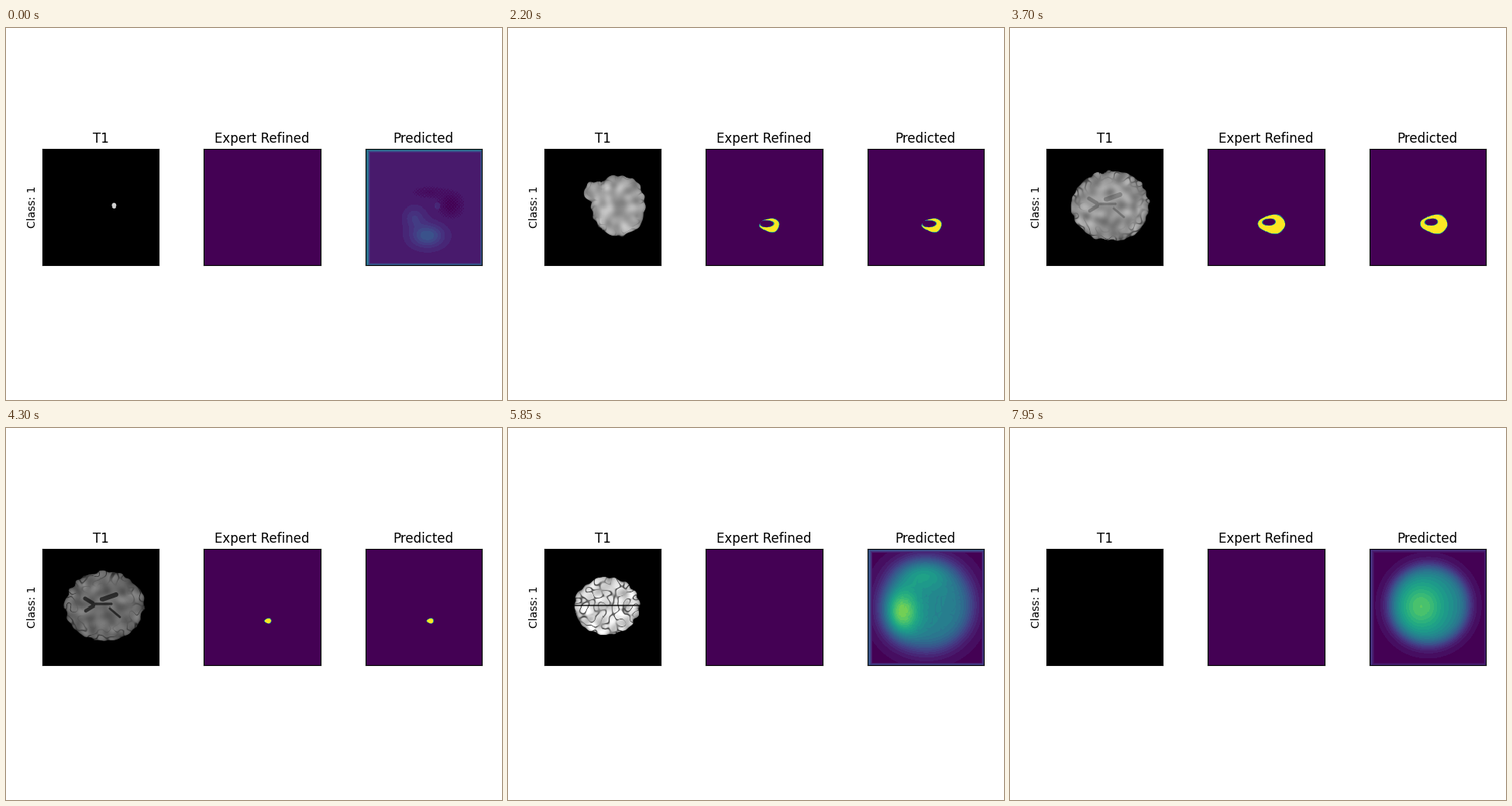
Animation of 640 by 480 pixels, one loop 8000 ms. Source, as a matplotlib script:

```python
import matplotlib.pyplot as plt
import numpy as np
from matplotlib.animation import FuncAnimation

FRAMES, N = 160, 150
LEFT, TOP, SIDE, STEP = 46.9, 155.9, 150.3, 208.4
LESION_FROM, LESION_TO = 31, 87  # slices where the lesion is segmented
CROWN, APEX = 80, 144            # widest and last slice of the head

rng = np.random.default_rng(11)
axis = (np.arange(N) + 0.5) * SIDE / N
X, Y = np.meshgrid(LEFT + axis, TOP + axis)
XP = X + 2 * STEP


def band_noise(k0, width):
    """Band-passed noise volume, slowly varying along the slice axis."""
    fz = np.fft.fftfreq(FRAMES)[:, None, None]
    fy = np.fft.fftfreq(N)[None, :, None]
    fx = np.fft.rfftfreq(N)[None, None, :]
    k = np.sqrt(fx**2 + fy**2 + (1.2 * fz)**2)
    spec = np.fft.rfftn(rng.standard_normal((FRAMES, N, N)))
    vol = np.fft.irfftn(spec * np.exp(-((k - k0) / width)**2), s=(FRAMES, N, N), axes=(0, 1, 2))
    return vol / vol.std()


folds = band_noise(0.082, 0.02)
shade = band_noise(0.05, 0.03)


def key(f, times, values):
    return float(np.interp(f, times, values))


def pulse(f, start, peak, end):
    return key(f, [start, peak, end], [0, 1, 0])


def gauss(x, y, cx, cy, sx, sy=None):
    return np.exp(-0.5 * (((x - cx) / sx)**2 + ((y - cy) / (sy or sx))**2))


def egg(x, y, cx, cy, rx, ry, taper=0):
    """Depth in pixels inside an ellipse that widens towards the right."""
    u = (x - cx) / rx
    v = (y - cy) / (ry * (1 + taper * np.clip(u, -1.2, 1.2)))
    return (1 - np.hypot(u, v)) * min(rx, ry)


def fill(depth):
    return np.clip(depth + 0.5, 0, 1)


def stroke(x0, y0, x1, y1, width):
    dx, dy = x1 - x0, y1 - y0
    t = np.clip(((X - x0) * dx + (Y - y0) * dy) / (dx * dx + dy * dy), 0, 1)
    return fill(width - np.hypot(X - x0 - t * dx, Y - y0 - t * dy))


SPLIT = stroke(70, 230, 185, 230, 1)
VENTRICLES = np.maximum.reduce([
    stroke(102, 221, 112, 227, 2.5), stroke(103, 236, 113, 230, 2.2),
    stroke(112, 228, 135, 228, 1.6), stroke(124, 222, 141, 216, 3),
    stroke(133, 233, 146, 244, 1.4)])


def head_depth(f):
    if f <= CROWN:
        times = [0, 28, 62, CROWN]
        cx = key(f, times, [138.5, 149, 133, 127])
        rx = key(f, times, [3, 21, 48, 50.5])
        ry = key(f, times, [3.2, 34, 45, 44.5])
    else:
        cx = 127
        rx = 50.5 * np.sqrt(max(0, 1 - ((f - CROWN) / (APEX - CROWN))**2)) + 0.01
        ry = 0.88 * rx
    depth = egg(X, Y, cx, 230, rx, ry, 0.14 * pulse(f, 30, 60, 80))
    # The frontal tip enters as a separate island and then merges
    tip = 14 * np.sin(np.pi * np.clip((f - 25) / 40, 0, 1))
    depth = np.maximum(depth, tip - np.hypot(X - 113, Y - 206 - 0.4 * max(0, f - 28)))
    return depth + 0.8 * min(1, rx / 20) * folds[f]


def scan(f):
    """Grey slice and its fold pattern."""
    depth = head_depth(f)
    mask = fill(depth) * (f < APEX)
    reach = key(f, [28, 62, 86, 110], [3, 7, 11, 80])
    power = key(f, [0, 28, 62, 117, 140], [0, 0.2, 0.5, 0.72, 0.95])
    width = key(f, [117, 140], [0.38, 0.8])
    lines = np.exp(-(folds[f] / width)**2) * np.exp(-(np.maximum(depth, 0) / reach)**2)
    lines *= np.clip(0.8 + 0.35 * shade[f], 0, 1)

    light = key(f, [0, 28, 70, 86, 117], [0.82, 0.66, 0.64, 0.43, 0.85])
    tone = light * (1 - power * lines) * (1 + 0.09 * min(1, f / 28) * shade[f])
    tone *= 1 - 0.4 * np.exp(-np.maximum(depth, 0) / 1.5) * min(1, f / 28)
    tone *= 1 - 0.5 * pulse(f, 8, 28, 46) * gauss(X, Y, 153, 229, 9, 5)
    pits = gauss(X, Y, 147, 230, 6, 4) + 0.6 * gauss(X, Y, 124, 212, 9, 3) + gauss(X, Y, 165, 243, 2)
    tone *= 1 - 0.8 * pulse(f, 42, 60, 76) * np.minimum(pits, 1)
    tone *= 1 - 0.3 * pulse(f, 38, 62, 92) * gauss(X, Y, 128, 251, 10, 7)
    tone *= 1 - 0.62 * pulse(f, 66, 86, 104) * VENTRICLES
    tone *= 1 - key(f, [92, 110], [0, 0.7]) * SPLIT
    return np.clip(tone, 0, 1) * mask, lines * mask


def lesion(f, x):
    """Open ring, thick on the right, that grows, closes and shrinks to a sliver."""
    size = key(f, [31, 55, 70, 86], [0.15, 1, 1.05, 0.22])
    cy = key(f, [70, 86], [254.5, 249])
    ring = fill(egg(x, Y, 337, cy, 20 * size, 14 * size, 0.3) + 0.4 * size * folds[f])
    hole = pulse(f, 34, 60, 84)**0.5
    if hole > 0:
        ring *= 1 - fill(egg(x, Y, 337 - 4 * size, cy - 3 * size, 13 * hole, 7 * hole)
                         + 0.5 * hole * shade[f])
    return ring


def speck(f, x, cx, cy):
    return fill(egg(x, Y, cx, cy, 2, 1.7)) * (57 <= f <= 66)


def expert(f):
    if not LESION_FROM <= f <= LESION_TO:
        return np.zeros_like(X)
    x = X + STEP
    return np.maximum(lesion(f, x), speck(f, x, 340, 237))


def early_heat(f):
    u = f / 28
    v = 0.072 + (0.09 + 0.33 * u) * gauss(XP, Y, 527, 245, 9 + 5 * u)
    v += (0.19 + 0.2 * u) * gauss(XP, Y, 543 + 7 * u, 268 - 5 * u, 14, 10)
    v += 0.09 * u * gauss(XP, Y, 562, 190, 16, 9)
    v += 0.06 * max(0, 1 - 2 * u) * fill(egg(XP, Y, 555.5, 230, 3.5, 4))
    checker = 1 + 0.6 * np.sin(XP * 1.57) * np.sin(Y * 1.57)
    v -= 0.07 * checker * gauss(XP, Y, 573 + 15 * u, 229, 10 + 5 * u)
    v -= 0.04 * checker * gauss(XP, Y, 545, 213, 14, 5)
    return v, 0.4 - 0.12 * u


def late_heat(f, lines):
    t = (f - LESION_TO) / (FRAMES - 1 - LESION_TO)
    rho = np.hypot(XP - 540, Y - 229)
    v = (0.44 + 0.22 * np.exp(-((t - 0.73) / 0.18)**2)) / (1 + np.exp((rho - 60 + 10 * t) / (10 - 4.5 * t)))
    v += (0.45 - 0.18 * t) * gauss(XP, Y, 492 + 38 * t, 243 - 12 * t, 12 + 8 * t, 18 + 4 * t)
    v += 0.5 * max(0, 0.73 - t) * gauss(XP, Y, 535, 188, 24, 14)
    v -= 0.05 * max(0, 1 - 1.4 * t) * lines
    return v, 0.3 - 0.16 * t * t


def predicted(f, lines):
    if LESION_FROM <= f <= LESION_TO:
        return np.maximum.reduce([lesion(f, X + STEP - 0.5), speck(f, XP, 538, 252), speck(f, XP, 565, 273)])
    v, edge = early_heat(f) if f < LESION_FROM else late_heat(f, lines)
    # Padding artefacts: wide at the top and left, thin elsewhere
    x, y = axis[None, :], axis[:, None]
    for d, reach in ((y, 5), (x, 5), (SIDE - x, 3), (SIDE - y, 2.6)):
        v = np.maximum(v, edge * (0.4 + 0.12 * reach) * np.exp(-(d / reach)**4))
    return np.round(np.clip(v, 0, 1) * 28) / 28


fig = plt.figure(figsize=(6.4, 4.8), dpi=100, facecolor='white')
images = []
for i, title in enumerate(('T1', 'Expert Refined', 'Predicted')):
    ax = fig.add_axes([(LEFT + i * STEP) / 640, (480 - TOP - SIDE) / 480, SIDE / 640, SIDE / 480])
    ax.set_xticks([])
    ax.set_yticks([])
    ax.set_title(title, fontsize=12)
    if i == 0:
        ax.set_ylabel('Class: 1', fontsize=10)
    images.append(ax.imshow(np.zeros((N, N)), cmap='viridis' if i else 'gray',
                            vmin=0, vmax=1, interpolation='nearest', aspect='auto'))


def update(f):
    grey, lines = scan(f)
    for im, data in zip(images, (grey, expert(f), predicted(f, lines))):
        im.set_data(data)
    return images


anim = FuncAnimation(fig, update, frames=FRAMES, interval=50, repeat=True, repeat_delay=0)
plt.show()
```
